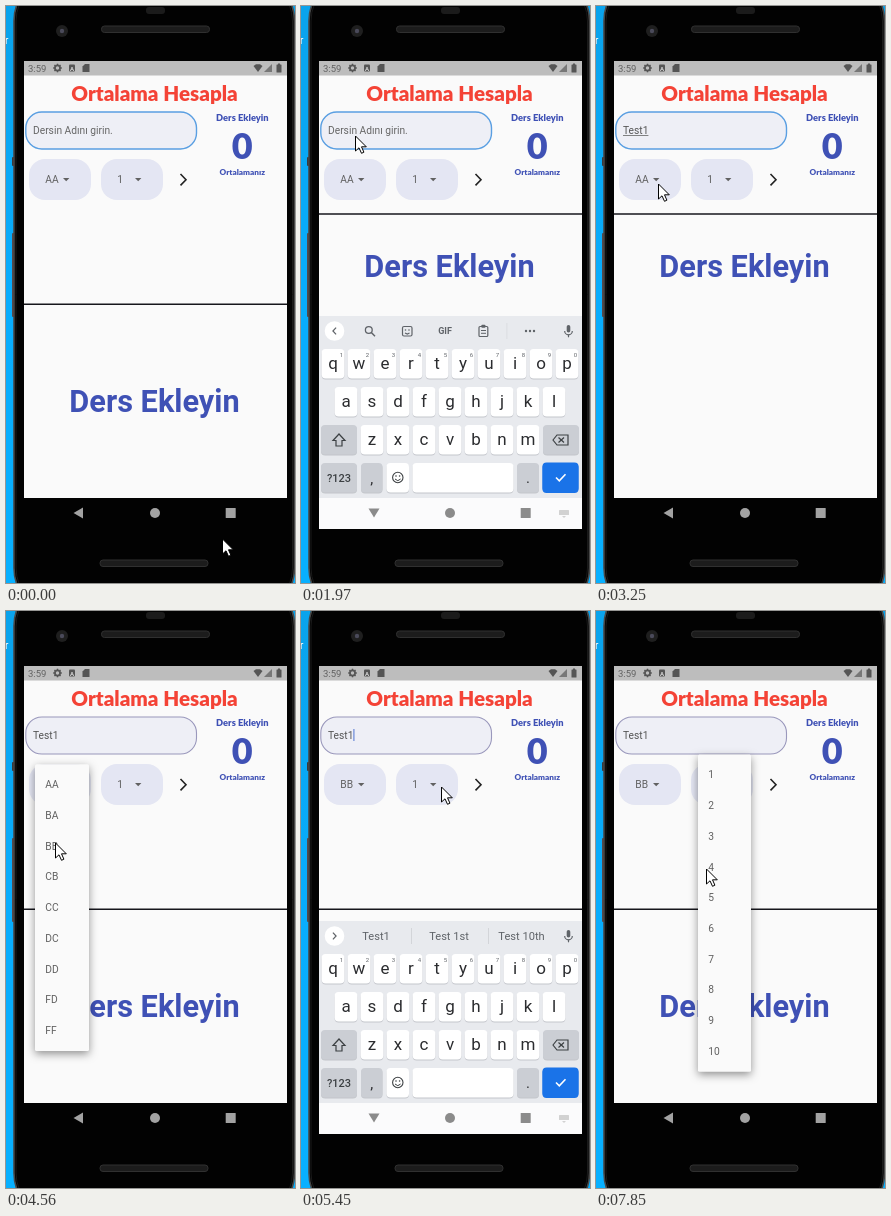
These frames come from a looping animation (289 by 577 pixels, 8 s). An HTML page with a canvas:

```html
<!DOCTYPE html>
<html lang="tr">
<head>
<meta charset="utf-8">
<style>
html, body { margin: 0; height: 100%; overflow: hidden; background: #0aa9fa; }
canvas { display: block; }
</style>
</head>
<body>
<canvas id="stage" width="289" height="577"></canvas>
<script>
const ctx = document.getElementById('stage').getContext('2d');
const LOOP = 8000, TAU = Math.PI * 2;
const INDIGO = '#3f51b5', PAPER = '#fafafa', GREY = '#5f6368', INK = '#616161';
const GRADES = ['AA', 'BA', 'BB', 'CB', 'CC', 'DC', 'DD', 'FD', 'FF'];
const CREDITS = Array.from({ length: 10 }, (_, i) => String(i + 1));
const ROW = 30.72;

// Mouse pointer: time, x, y
const POINTER = [
  [30, 216, 532], [870, 54, 129], [2260, 54, 129], [2500, 60, 172], [2930, 60, 172],
  [3250, 62, 177], [3870, 62, 177], [4070, 43, 244], [4230, 43, 244], [4360, 36, 236],
  [4480, 44, 219], [4560, 49, 231], [5000, 49, 231], [5440, 140, 175], [5600, 142, 175],
  [6140, 142, 175], [6600, 133, 173], [7290, 133, 173], [7580, 98, 245], [7740, 98, 245],
  [7850, 110, 257]
];

const clamp = v => Math.max(0, Math.min(1, v));
const within = (t, a, b) => t >= a && t < b;
const easeOut = p => 1 - (1 - clamp(p)) ** 2;

function box(x, y, w, h, r, fill, stroke, width = 1) {
  ctx.beginPath();
  ctx.roundRect(x, y, w, h, r);
  if (fill) { ctx.fillStyle = fill; ctx.fill(); }
  if (stroke) { ctx.strokeStyle = stroke; ctx.lineWidth = width; ctx.stroke(); }
}

function disc(x, y, r, fill, stroke, width) {
  box(x - r, y - r, 2 * r, 2 * r, r, fill, stroke, width);
}

function path(points, { fill, stroke, width = 1, close = !!fill }) {
  ctx.beginPath();
  for (let i = 0; i < points.length; i += 2) ctx.lineTo(points[i], points[i + 1]);
  if (close) ctx.closePath();
  if (fill) { ctx.fillStyle = fill; ctx.fill(); }
  if (stroke) { ctx.strokeStyle = stroke; ctx.lineWidth = width; ctx.stroke(); }
}

function text(s, x, y, font, color, align = 'left') {
  ctx.font = font + ', sans-serif';
  ctx.fillStyle = color;
  ctx.textAlign = align;
  ctx.fillText(s, x, y);
}

function drawPhone() {
  const sky = ctx.createLinearGradient(0, 0, 0, 577);
  sky.addColorStop(0, '#0aa3ec');
  sky.addColorStop(0.5, '#08adfd');
  sky.addColorStop(1, '#08b0ff');
  box(0, 0, 289, 577, 0, sky);
  text('r', -1, 38, '10px Roboto', '#fff');
  box(6, 151, 4, 9, 1, '#3a3a3c');
  box(6, 227, 4, 84, 1, '#57484a');
  box(8, -30, 280.5, 637, 45, '#020202', '#484848', 1.6);
  box(10, -28, 276.5, 633, 43, null, '#1a1a1a');
  box(140, 1, 19, 7, 3, '#1b1b1b');
  disc(56, 25, 6, '#1f1f1f');
  disc(56, 25, 2.2, '#4a4a5a');
  for (const [x, y] of [[95.5, 20], [94, 554]]) box(x, y, 108, 6.5, 3, '#1c1c1c', '#303030');
}

function drawStatusBar() {
  box(18, 55, 263, 14.5, 0, '#bdbdbd');
  text('3:59', 22, 66, '9.5px Roboto', INK);
  disc(51.5, 62, 2.6, null, '#555', 1.8);
  for (let i = 0; i < 8; i++) {
    const c = Math.cos(i * TAU / 8), s = Math.sin(i * TAU / 8);
    path([51.5 + 3 * c, 62 + 3 * s, 51.5 + 4.3 * c, 62 + 4.3 * s], { stroke: '#555', width: 1.4 });
  }
  box(63, 58.5, 6, 7, 1, '#555');
  text('A', 66, 64.5, 'bold 6px Roboto', '#ddd', 'center');
  path([79, 58, 83.5, 58, 83.5, 66, 76.5, 66, 76.5, 60.5], { fill: '#555' });
  path([247.5, 60, 250, 58.3, 254, 58.3, 256.5, 60, 252, 66], { fill: '#555' });
  path([258, 66, 266, 58, 266, 66], { fill: '#777' });
  box(270.5, 58.5, 5, 8, 0.5, '#555');
  box(272, 57.5, 2, 1.5, 0, '#555');
}

function drawChip(x, label) {
  box(x, 153, 62, 41, 16, '#e4e6f3');
  text(label, x + 16.3, 177, '10.24px Roboto', INK);
  const a = x + 34;
  path([a, 172, a + 6.4, 172, a + 3.2, 175.3], { fill: INK });
}

function drawApp(t, typed) {
  const compact = within(t, 1590, 3530) || within(t, 5730, 7220);
  const focused = t < 3530 || within(t, 5700, 7220);
  const caret = within(t, 470, 970) || within(t, 1470, 1970) || within(t, 5300, 6190);
  const underlined = within(t, 2300, 3530) || within(t, 5730, 7220);

  box(18, 55, 263, 437, 0, PAPER);
  drawStatusBar();
  text('Ortalama Hesapla', 148.5, 95, '900 20.6px Lato', '#f44336', 'center');
  text('Ders Ekleyin', 236.3, 115, '900 9.3px Lato', INDIGO, 'center');
  text('0', 236.3, 153, '900 36px Lato', INDIGO, 'center');
  text('Ortalamanız', 236.3, 169, '900 8.2px Lato', INDIGO, 'center');

  box(19.8, 106, 170.7, 37, 16, '#eeeff6', focused ? '#5a9fe2' : '#9a98bc', focused ? 1.4 : 1.1);
  text(typed || 'Dersin Adını girin.', 27, 127.5, '10.24px Roboto', typed ? '#555' : '#666');
  const end = typed ? 27 + ctx.measureText(typed).width : 27;
  if (underlined) box(27, 129, end - 27, 0.8, 0, '#666');
  if (caret) box(end, 118, 1, 12, 0, '#4f74d0');

  drawChip(23, t < 4890 ? 'AA' : 'BB');
  drawChip(95, '1');
  path([174.5, 168, 180, 173.7, 174.5, 179.4], { stroke: '#222', width: 1.6 });

  box(18, compact ? 207.2 : 297.5, 263, 1.5, 0, '#16161c');
  text('Ders Ekleyin', 148.5, compact ? 270.5 : 406, 'bold 30.72px Roboto', INDIGO, 'center');
}

function drawMenu(x, y, w, items, open) {
  if (open <= 0) return;
  const full = items.length * ROW + 10.24;
  const h = 41 + (full - 41) * open;
  ctx.save();
  ctx.globalAlpha = clamp(open * 1.6);
  ctx.shadowColor = 'rgba(0,0,0,.42)';
  ctx.shadowBlur = 8;
  ctx.shadowOffsetY = 3;
  box(x, y, w, h, 1.5, PAPER);
  ctx.shadowColor = 'transparent';
  ctx.clip();
  items.forEach((s, i) => text(s, x + 10.3, y + 24 + i * ROW, '10.24px Roboto', INK));
  ctx.restore();
}

function drawMic(x, y) {
  box(x - 1.8, y - 6, 3.6, 7.5, 1.8, GREY);
  ctx.beginPath();
  ctx.arc(x, y, 3.8, 0, Math.PI);
  ctx.strokeStyle = GREY;
  ctx.lineWidth = 1.2;
  ctx.stroke();
  box(x - 0.6, y + 3.5, 1.2, 2.8, 0, GREY);
}

function drawToolbar(suggesting) {
  const d = suggesting ? 1.6 : -1.6, pen = { stroke: GREY, width: 1.2 };
  disc(33.5, 325, 9.8, '#fff');
  path([33.5 - d, 321.6, 33.5 + d, 325, 33.5 - d, 328.4], pen);
  drawMic(267.5, 325);
  if (suggesting) {
    [['Test1', 75], ['Test 1st', 148], ['Test 10th', 220.5]].forEach(([s, x]) =>
      text(s, x, 329.3, '11.1px Roboto', GREY, 'center'));
    for (const x of [110, 187]) box(x, 317, 0.8, 16, 0, '#cdd0d4');
    return;
  }
  disc(67.8, 324, 3.4, null, GREY, 1.3);
  path([70.3, 326.5, 74, 330.2], { stroke: GREY, width: 1.5 });
  box(101.5, 320.5, 9.5, 9.5, 1.5, null, GREY, 1.2);
  disc(104.5, 324, 0.8, GREY);
  disc(108, 324, 0.8, GREY);
  path([104, 327, 106.3, 328, 108.5, 327], pen);
  text('GIF', 144, 328.3, 'bold 9px Roboto', GREY, 'center');
  box(178, 320.5, 8.8, 10, 1, null, GREY, 1.2);
  box(180.3, 318.8, 4.2, 3, 1, GREY);
  for (const y of [324.5, 327.3]) path([180, y, 185, y], { stroke: GREY });
  box(205.5, 317, 0.8, 16, 0, '#d8dade');
  for (const x of [225, 229, 233]) disc(x, 325, 1.2, GREY);
}

function drawKey(x, y, w, fill = '#fff', edge = '#c3c6cb') {
  box(x, y + 1, w, 29.5, 4, edge);
  box(x, y, w, 29.5, 4, fill);
}

function drawKeyboard(offset, suggesting) {
  const dark = '#cbced4', ink = '#2b2c2f', blue = '#1a73e8';
  ctx.save();
  ctx.beginPath();
  ctx.rect(18, 55, 263, 468);
  ctx.clip();
  ctx.translate(0, offset);
  box(18, 310, 263, 182, 0, '#e8eaee');
  box(18, 492, 263, 31, 0, '#fbfbfc');
  drawToolbar(suggesting);

  [['qwertyuiop', 32, 343], ['asdfghjkl', 45, 381], ['zxcvbnm', 71, 419]].forEach(([row, x0, y], r) =>
    [...row].forEach((letter, i) => {
      const x = x0 + i * 26;
      drawKey(x - 11.4, y, 22.8);
      text(letter, x, y + 20, '17px Roboto', ink, 'center');
      if (!r) text((i + 1) % 10, x + 8.5, y + 7.7, '6px Roboto', GREY, 'center');
    }));

  for (const [x, y, w] of [[20, 419, 36], [242, 419, 36], [20, 457, 36], [60, 457, 21.5], [216, 457, 22]])
    drawKey(x, y, w, dark);
  drawKey(85.5, 457, 22.5);
  drawKey(111.5, 457, 101);
  drawKey(241.5, 456.5, 36, blue, blue);

  const pen = { stroke: '#3c4043', width: 1.2, close: true };
  path([38, 428, 44, 434.5, 41, 434.5, 41, 440, 35, 440, 35, 434.5, 32, 434.5], pen);
  path([252, 434, 256, 429, 267, 429, 267, 439, 256, 439], pen);
  path([257.5, 431.5, 263, 436.5], pen);
  path([263, 431.5, 257.5, 436.5], pen);
  text('?123', 38, 475.5, '500 11px Roboto', '#3c4043', 'center');
  text(',', 70.8, 478, '15px Roboto', ink, 'center');
  text('.', 227, 477, '15px Roboto', ink, 'center');
  disc(96.8, 471.5, 5.2, null, '#3c4043', 1.1);
  disc(95, 470, 0.8, '#3c4043');
  disc(98.6, 470, 0.8, '#3c4043');
  path([94, 473, 96.8, 474.7, 99.6, 473], { stroke: '#3c4043' });
  path([255, 471.5, 258.3, 474.8, 264.5, 468.3], { stroke: '#fff', width: 1.6 });
  ctx.restore();
}

function drawNav(keyboardShown, settled) {
  const c = keyboardShown ? '#8b8b8b' : '#a2a2a2';
  if (keyboardShown) path([67.5, 502.5, 78.5, 502.5, 73, 511.5], { fill: c });
  else path([77, 501.5, 77, 512.5, 67.5, 507], { fill: c });
  disc(149, 507, 5, c);
  box(219.7, 502, 10, 10, 0.5, c);
  if (settled) {
    box(258, 504, 10, 5, 0.5, '#d2d2d2');
    path([261, 510, 265, 510, 263, 512], { fill: '#d2d2d2' });
  }
}

function keyboardOffset(t) {
  const rise = start => 213 * (1 - easeOut((t - start) / 320));
  const fall = start => 213 * easeOut((t - start + 68) / 280);
  if (within(t, 1000, 2970)) return rise(960);
  if (within(t, 2970, 3250)) return fall(2970);
  if (within(t, 5080, 6800)) return rise(5060);
  if (t >= 6800) return fall(6800);
  return 213;
}

function drawPointer(t) {
  let i = POINTER.findIndex(p => p[0] > t);
  if (i < 0) i = POINTER.length;
  const a = POINTER[Math.max(0, i - 1)], b = POINTER[Math.min(i, POINTER.length - 1)];
  const p = b[0] > a[0] ? clamp((t - a[0]) / (b[0] - a[0])) : 0;
  const k = p * p * (3 - 2 * p);
  ctx.save();
  ctx.translate(a[1] + (b[1] - a[1]) * k + 0.5, a[2] + (b[2] - a[2]) * k + 0.5);
  path([0, 0.5, 0, 15.5, 3.5, 12.3, 6, 17.8, 8.4, 16.7, 6, 11.3, 10.8, 11.3],
    { fill: '#fff', stroke: '#000' });
  ctx.restore();
}

function draw(t) {
  const typed = 'Test1'.slice(0, t < 2300 ? 0 : t < 2400 ? 2 : t < 2490 ? 4 : 5);
  const offset = keyboardOffset(t), shown = offset < 212.5;
  drawPhone();
  drawApp(t, typed);
  drawMenu(29, 153.2, 54, GRADES, clamp((t - 3490) / 110) * clamp((5000 - t) / 110));
  drawMenu(102, 143.4, 53, CREDITS, clamp((t - 7200) / 110));
  if (shown) drawKeyboard(offset, t >= 2300);
  drawNav(shown, offset < 1);
  drawPointer(t);
}

function tick(now) {
  draw(now % LOOP);
  requestAnimationFrame(tick);
}
requestAnimationFrame(tick);
</script>
</body>
</html>
```
